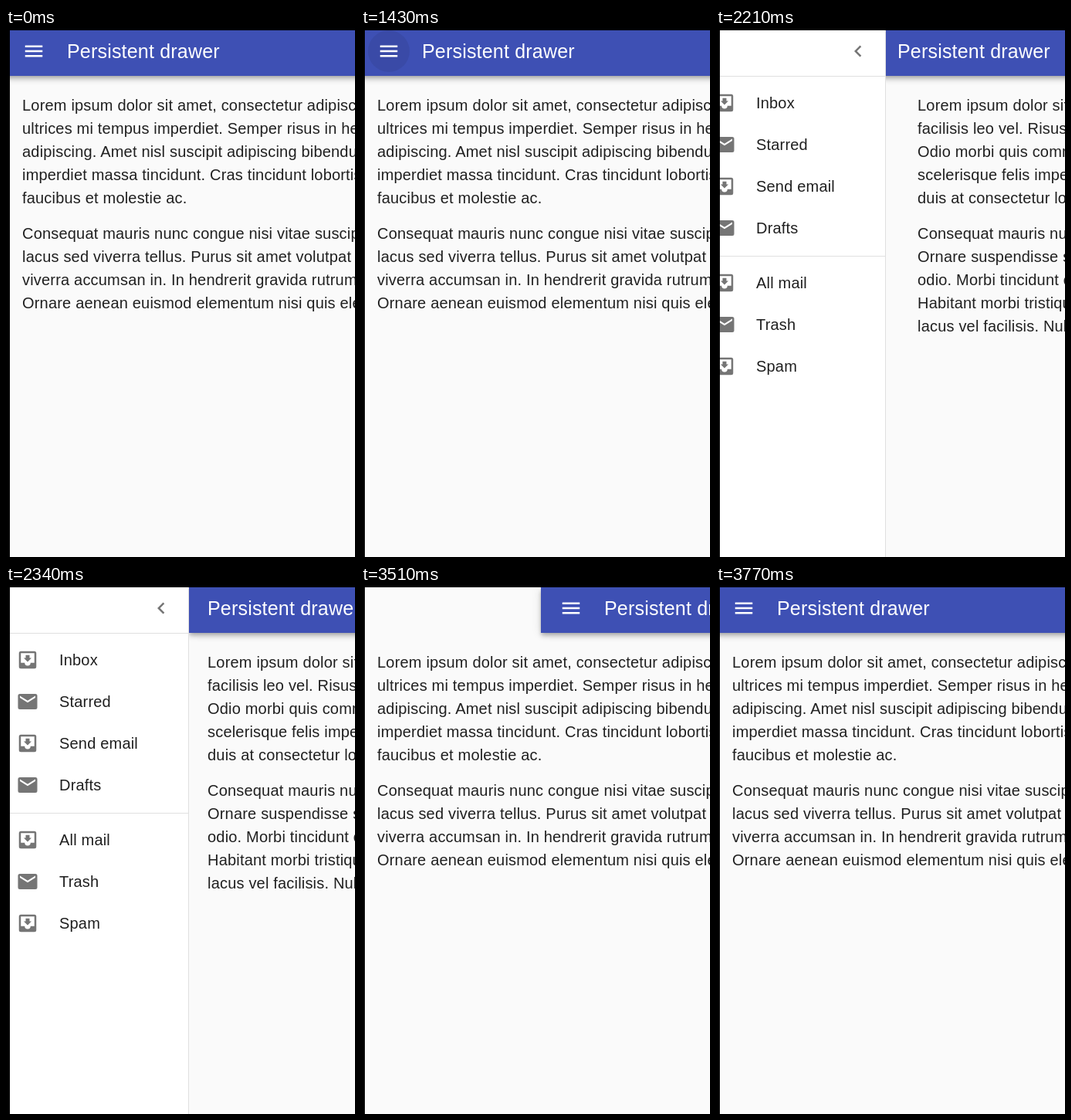
These frames come from a looping animation (452 by 685 pixels, 4160 ms). An HTML page:

```html
<!DOCTYPE html>
<html lang="en">
<head>
<meta charset="utf-8">
<title>Persistent drawer</title>
<style>
  html, body { margin: 0; width: 100%; height: 100%; overflow: hidden; background: #fafafa; }

  #stage {
    position: relative; width: 452px; height: 685px; overflow: hidden;
    background: #fafafa; color: #202020;
    font: 20px/30px "Liberation Sans", Arial, Helvetica, sans-serif;
    letter-spacing: .19px; white-space: pre;
  }
  #stage::after {
    content: ""; position: absolute; inset: 0;
    border: solid #000; border-width: 3px 0 0 5px;
  }

  svg { width: 30px; height: 30px; fill: currentColor; flex: none; }

  /* All state changes are held steps on one shared clock. */
  .closed, .open, #bar, #drawer, .button { animation: 4160ms step-end infinite; }
  .closed { animation-name: closed; }
  .open { animation-name: open; }

  main { position: absolute; top: 85px; }
  main.closed { left: 21px; }
  main.open { left: 261px; }
  p { margin: 0 0 16px; }

  #bar {
    position: absolute; left: -3px; top: 3px; width: 700px; height: 59px;
    background: #3e50b4; color: #fff; font-size: 25px; line-height: 54px;
    box-shadow: 0 2.5px 5px -1px #0003, 0 5px 6px #00000024, 0 1px 12px #0000001f;
    animation-name: bar;
  }
  .title { position: absolute; top: 0; }
  .title.closed { left: 82px; }
  .title.open { left: 24px; }

  .button {
    position: absolute; top: 0; width: 54px; height: 54px; border-radius: 50%;
    display: flex; align-items: center; justify-content: center;
  }
  .menu { left: 12px; animation-name: closed, menu-hover; }
  .back { left: 177px; top: 3px; color: #757575; animation-name: back-hover; }

  #drawer {
    position: absolute; left: -3px; top: 0; width: 239px; height: 685px;
    background: #fff; border-right: 1px solid #e0e0e0;
    animation-name: drawer;
  }
  .group {
    position: absolute; left: 0; right: 0; padding-top: 7px;
    border-top: 1px solid #e0e0e0;
  }
  .row { display: flex; align-items: center; height: 54px; padding-left: 16px; }
  .row svg { margin-right: 26px; color: #757575; }

  @keyframes closed {
    0%, 84.375% { visibility: visible; }
    50% { visibility: hidden; }
  }
  @keyframes open {
    0%, 84.375% { visibility: hidden; }
    50% { visibility: visible; }
  }
  @keyframes bar {
    0%, 90.625% { transform: none; }
    53.125% { transform: translateX(214px); }
    56.25% { transform: translateX(240px); }
    84.375% { transform: translateX(236px); }
    87.5% { transform: translateX(33px); }
  }
  @keyframes drawer {
    0%, 84.375% { transform: translateX(-260px); }
    50% { transform: translateX(-182px); }
    53.125% { transform: translateX(-17px); }
    56.25% { transform: none; }
  }
  @keyframes menu-hover {
    0%, 50% { background: transparent; }
    31.25% { background: rgba(0, 0, 0, .04); }
    34.375% { background: rgba(0, 0, 0, .07); }
  }
  @keyframes back-hover {
    0%, 84.375% { background: transparent; }
    78.125% { background: rgba(0, 0, 0, .045); }
  }
</style>
</head>
<body>
<svg style="display:none">
  <symbol id="hamburger" viewBox="0 0 24 24"><path d="M3 18h18v-2H3v2zm0-5h18v-2H3v2zm0-7v2h18V6H3z"/></symbol>
  <symbol id="chevron" viewBox="0 0 24 24"><path d="M15.41 7.41L14 6l-6 6 6 6 1.41-1.41L10.83 12z"/></symbol>
  <symbol id="inbox" viewBox="0 0 24 24"><path d="M19 3H5a2 2 0 0 0-2 2v14a2 2 0 0 0 2 2h14a2 2 0 0 0 2-2V5a2 2 0 0 0-2-2zm0 12h-4a3 3 0 0 1-6 0H5V5h14v10zm-3-5h-2V7h-4v3H8l4 4 4-4z"/></symbol>
  <symbol id="mail" viewBox="0 0 24 24"><path d="M20 4H4a2 2 0 0 0-2 2v12a2 2 0 0 0 2 2h16a2 2 0 0 0 2-2V6a2 2 0 0 0-2-2zm0 4l-8 5-8-5V6l8 5 8-5v2z"/></symbol>
</svg>

<div id="stage">
  <main class="closed"><p>Lorem ipsum dolor sit amet, consectetur adipiscing elit
ultrices mi tempus imperdiet. Semper risus in hendrerit
adipiscing. Amet nisl suscipit adipiscing bibendum est
imperdiet massa tincidunt. Cras tincidunt lobortis feugiat
faucibus et molestie ac.</p><p>Consequat mauris nunc congue nisi vitae suscipit
lacus sed viverra tellus. Purus sit amet volutpat consequat
viverra accumsan in. In hendrerit gravida rutrum quisque
Ornare aenean euismod elementum nisi quis eleifend</p></main>

  <main class="open"><p>Lorem ipsum dolor sit amet
facilisis leo vel. Risus at
Odio morbi quis commodo
scelerisque felis imperdiet
duis at consectetur lorem</p><p>Consequat mauris nunc
Ornare suspendisse sed
odio. Morbi tincidunt ornare
Habitant morbi tristique
lacus vel facilisis. Nulla</p></main>

  <div id="bar">
    <div class="button menu"><svg><use href="#hamburger"/></svg></div>
    <div class="title closed">Persistent drawer</div>
    <div class="title open">Persistent drawer</div>
  </div>

  <div id="drawer">
    <div class="button back"><svg><use href="#chevron"/></svg></div>
    <div class="group" style="top:62px">
      <div class="row"><svg><use href="#inbox"/></svg>Inbox</div>
      <div class="row"><svg><use href="#mail"/></svg>Starred</div>
      <div class="row"><svg><use href="#inbox"/></svg>Send email</div>
      <div class="row"><svg><use href="#mail"/></svg>Drafts</div>
    </div>
    <div class="group" style="top:295px">
      <div class="row"><svg><use href="#inbox"/></svg>All mail</div>
      <div class="row"><svg><use href="#mail"/></svg>Trash</div>
      <div class="row"><svg><use href="#inbox"/></svg>Spam</div>
    </div>
  </div>
</div>
<script>
  // Collapse layout whitespace that white-space: pre would otherwise keep.
  for (const box of document.querySelectorAll("#stage, #bar, #drawer, .group"))
    for (const node of [...box.childNodes])
      if (node.nodeType === Node.TEXT_NODE) node.remove();
</script>
</body>
</html>
```
